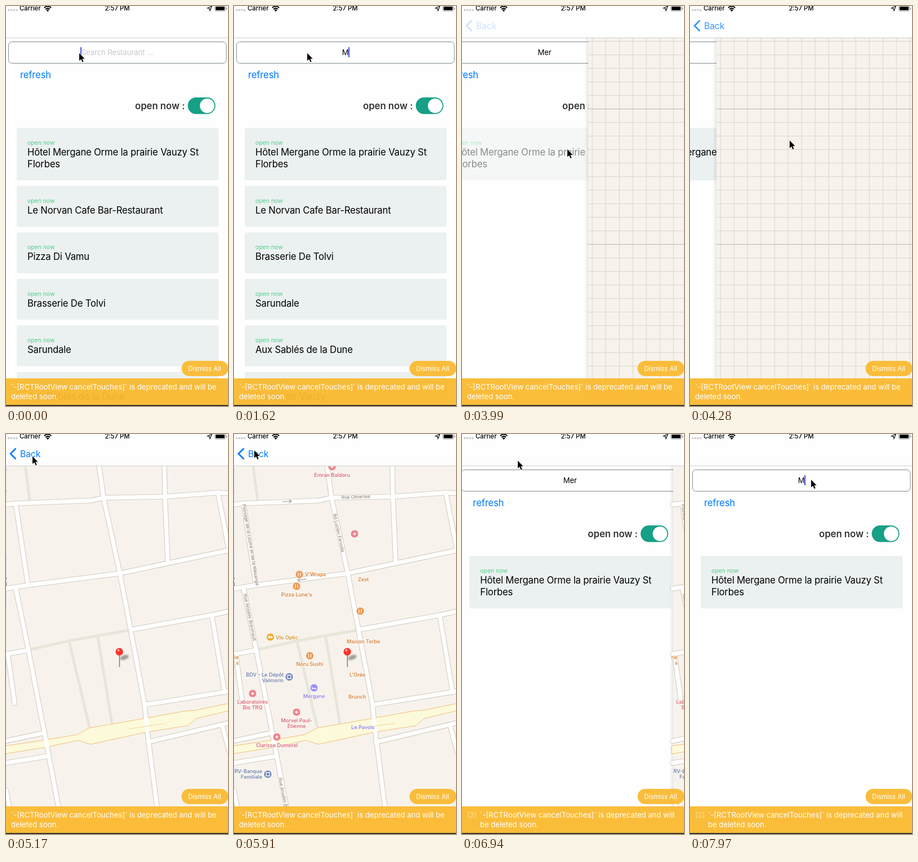
An HTML page that plays this animation: 394 px wide and 709 px high, repeating every 8 s.

```html
<!DOCTYPE html>
<html lang="fr">
<head>
<meta charset="utf-8">
<title>Restaurant search</title>
<style>
html, body { margin: 0; height: 100%; overflow: hidden; background: #fff; }
svg { display: block; width: 100vw; height: 100vh; font-family: Inter, Roboto, sans-serif; }
text { white-space: pre; }
.poi { font-size: 9.1px; font-weight: 500; }
.street { font-size: 8px; fill: #85807b; }
.poi, .street { paint-order: stroke; stroke: #faf7f1; stroke-width: 2px; stroke-linejoin: round; }
</style>
</head>
<body>
<svg id="stage" viewBox="0 0 394 709" preserveAspectRatio="none"></svg>
<script>
const STEP = 147.7, LOOP = 8000, BLUE = '#007aff';
const $ = id => document.getElementById(id);

const text = (x, y, size, str, fill, more = '') =>
  `<text x="${x}" y="${y}" font-size="${size}" fill="${fill}" ${more}>${str}</text>`;
const rect = (x, y, w, h, r, fill, more = '') =>
  `<rect x="${x}" y="${y}" width="${w}" height="${h}" rx="${r}" fill="${fill}" ${more}/>`;
const line = (d, color, width, more = '') =>
  `<path d="${d}" fill="none" stroke="${color}" stroke-width="${width}" ${more}/>`;
const MID = 'text-anchor="middle"';

// ---- restaurant list ----
const HOTEL = ['Hôtel Mergane Orme la prairie Vauzy St', 'Florbes'];
const OTHERS = ['Le Norvan Cafe Bar-Restaurant', 'Pizza Di Vamu', 'Brasserie De Tolvi',
  'Sarundale', 'Aux Sablés de la Dune', 'Panier de Vauzy'];

function card(y, lines) {
  return rect(19, y, 358, lines.length > 1 ? 93 : 72.3, 3, '#ebf0f0') +
    text(38, y + 30, 10.4, 'open now', '#50d089') +
    lines.map((s, i) => text(38, y + 49 + 21 * i, 16.7, s, '#000', 'letter-spacing="-.2"')).join('');
}
const cards = names => card(216, HOTEL) + names.map((s, i) => card(319 + 82.4 * i, [s])).join('');
const LISTS = [OTHERS.slice(0, 5), OTHERS.filter(s => !s.startsWith('Pizza')), []].map(cards);

const list = `
  ${rect(0, 0, 394, 709, 0, '#fefefe')}
  ${rect(4.5, 63.5, 386.5, 38, 6, '#fff', 'stroke="#7f8c8d"')}
  <rect id="selection" x="183" y="73" width="29" height="18" fill="#c8daee"/>
  ${text(197.5, 87, 13, '', '#000', 'id="input" ' + MID)}
  <rect id="caret" y="73" width="2" height="18" fill="#4a55dc"/>
  ${text(25, 128, 16.7, 'refresh', BLUE, 'letter-spacing="-.2"')}
  ${text(229, 183, 16.7, 'open now :', '#333', 'font-weight="600"')}
  ${rect(322.6, 162, 49, 29.6, 14.8, '#16a085')}
  <circle cx="357" cy="176.8" r="12.9" fill="#fff"/>
  <g id="cards"></g>
  <g id="bubble">
    <path d="M182.5 92.5H217a10 10 0 0 1 0 20.5H182.5Z" fill="#fff" stroke="#ccc"/>
    ${text(185, 108, 13, 'Met', BLUE)}
    ${line('M212 99.5l7 7m0-7l-7 7', '#aaa', 1)}
  </g>`;

// ---- map ----
let grid = '';
for (let i = 0; i < 17; i++) grid += `M${8 + 24 * i} 56V709`;
for (let i = 0; i < 27; i++) grid += `M0 ${62.5 + 24 * i}H396`;

const LANES = 'M34 56L42 118M43 382L110 367 160 358 218 348M112 368L148 520M163 360L188 514';
const ROADS = 'M0 125L18 123 150 118 173 113 282 111 375 104 396 105' +
  'M165 56L173 113 202 247 221 347 246 480 249 514 268 662M281 56L282 111 287 228' +
  'M376 104L396 208M0 274L39 268 202 247 287 229 396 206M17 124L39 268' +
  'M17 273L40 385 72 550 93 662M221 347L365 321 396 314M365 321L388 458' +
  'M246 480L396 456M0 390L40 383M3 390L15 477M0 544L66 530M0 583L74 571' +
  'M252 546L383 515 396 512M383 515L396 562M0 632L6 662';
const AVENUE = 'M-2 553L45 546 72 542 125 533 148 521 246 504 318 491 335 490 398 477V490' +
  'L338 504 322 517 246 529 150 550 128 543 72 555-2 567Z';
const ROUND = 'stroke-linecap="round" stroke-linejoin="round"';

const roads = line(LANES, '#e8e5d9', 5) + line(ROADS, '#d3ccc2', 9.6, ROUND) +
  `<path d="${AVENUE}" fill="#fcfadb" stroke="#f3bd77"/>` +
  line(ROADS, '#fff', 7.4, ROUND) +
  line('M217 523L250 518M247 518L285 513', '#f3c98d', .8);

const FOOD = ['#ee9650', '#d8762f', 'M-2-3.5V3.5M2-3.5V3.5'];
const CARE = ['#f0818e', '#d95a70', 'M-3 0H3M0-3V3'];
const BANK = ['#6f83b3', '#6478a8', 'M-3-3H3V3H-3Z'];
const STAY = ['#9d8ef2', '#8b79ea', 'M-3.5-2V2.5M-3.5 1H3.5V2.5'];
const SHOP = ['#f1ad2f', '#d08c20', 'M-3.5 0a1.5 1.5 0 1 0 3 0a1.5 1.5 0 1 0-3 0M.5 0a1.5 1.5 0 1 0 3 0a1.5 1.5 0 1 0-3 0'];

const icon = ([color, , mark], x, y) =>
  `<g transform="translate(${x} ${y})"><circle r="7" fill="${color}" stroke="#fff" stroke-width=".8"/>${line(mark, '#fff', 1.3)}</g>`;
const label = (kind, x, y, lines, anchor = 'middle') => lines.split('|').map((s, i) =>
  `<text class="poi" x="${x}" y="${y + 10 * i}" fill="${kind[1]}" text-anchor="${anchor}">${s}</text>`).join('');
const below = (kind, x, y, lines) => icon(kind, x, y) + label(kind, x, y + 17.5, lines);
const street = (x, y, angle, s) =>
  `<text class="street" transform="translate(${x} ${y}) rotate(${angle})">${s}</text>`;

const places =
  line('M86 120L102 119M98 116.5L102 119 98 122M129 257L113 259M117 256L113 259 117 261.5', '#b5b1ac', 1.6) +
  street(191, 115, -2, 'Rue Olmeraie') + street(176, 142, 78, 'Bd Lucien Farvolle') +
  street(15, 125, 80.5, 'Passage de la Loutre et de la Mésange') +
  street(17, 284, 78.5, 'Rue Anselm Brevinault') + street(79, 610, 78.5, 'Rue Anselm Brevinault') +
  below(CARE, 174, 58, 'Emran Baldoru') + icon(CARE, 214, 177) + icon(FOOD, 224, 314) +
  icon(FOOD, 116, 249) + label(FOOD, 126, 252, "V'Wraps", 'start') +
  below(FOOD, 111, 270, "Pizza Lune's") + label(FOOD, 220, 261, 'Zest', 'start') +
  icon(SHOP, 64.5, 360) + label(SHOP, 74, 364, 'Vlo Optic', 'start') +
  below(FOOD, 134.5, 393, 'Noru Sushi') +
  icon(BANK, 98, 430.5) + label(BANK, 88, 430, 'BDV - Le Dépôt|Valmorin', 'end') +
  below(CARE, 33, 460, 'Laboratoires|Bio TRQ') + below(STAY, 142, 450, 'Mergane') +
  below(CARE, 111, 493, 'Morvel Paul-|Étienne') + below(CARE, 76, 537, 'Clarisse Dumorel') +
  icon(BANK, 60, 603) + label(BANK, 50, 601, 'RV-Banque|Familiale', 'end') +
  label(FOOD, 8.5, 399, 'rie|s', 'end') + label(FOOD, 200, 371, 'Maison Torbe', 'start') +
  label(FOOD, 205, 430, "L'Orée", 'start') + label(FOOD, 203, 469, 'Brunch', 'start') +
  label(STAY, 208, 523, 'Le Pavois', 'start');

const pin = `
  <ellipse cx="210" cy="396" rx="8" ry="4" transform="rotate(-20 210 396)" fill="#000" opacity=".35" filter="url(#soft)"/>
  ${line('M201.3 391V413', '#85817e', 1.6)}
  <circle cx="201" cy="386" r="6.7" fill="#fb352b"/>
  <circle cx="199.3" cy="383.5" r="1.9" fill="#ffb1a8"/>`;

const map = `
  ${rect(-7, 56, 7, 653, 0, 'url(#edge)')}
  ${rect(0, 56, 396, 653, 0, '#f7f3ec')}
  <g transform="translate(-1)">
    <g id="grid">${line(grid, '#dad5cb', 1)}${line('M0 182.5H396M0 422.5H396', '#b9b4ab', 1)}</g>
    <g id="roads">${roads}<g id="places">${places}</g>${pin}</g>
  </g>`;

// ---- fixed chrome ----
const bars = `
  ${rect(0, 0, 394, 56, 0, '#fefefe')}${rect(0, 56, 394, 1, 0, '#d0d0d0')}
  ${[5, 9.7, 14.3, 19].map(x => `<circle cx="${x}" cy="7.3" r="1.7" fill="#c6c6c6"/>`).join('')}
  ${text(24, 8, 11.3, 'Carrier', '#000', 'font-weight="500"')}
  ${line('M67.8 3.2Q74 -2.2 80.2 3.2M70.2 5.8Q74 2.4 77.8 5.8', '#000', 2)}
  <path d="M71.5 7.4Q74 5.3 76.5 7.4L74 10Z"/>
  ${text(197.5, 8, 11.3, '2:57 PM', '#000', 'font-weight="500" ' + MID)}
  ${line('M357.5 3.8L365.5 0 362 8.3 361.3 4.5Z', '#000', 1.1)}
  ${rect(370.5, -.5, 19, 9.5, 2.5, '#fff', 'stroke="#999"')}${rect(372, 1, 16, 6.5, 1.3, '#000')}
  ${rect(390.7, 2.5, 1.5, 4, .7, '#999')}
  <g id="back">
    ${line('M17.5 25.5L8 35 17.5 44.5', BLUE, 2.8)}
    ${text(25, 41, 15.8, 'Back', BLUE, 'letter-spacing="-.2"')}
  </g>`;

const warning = `
  ${rect(311.5, 629, 83, 27, 13.5, '#fabb35', 'fill-opacity=".97"')}
  ${text(352.5, 647, 11.4, 'Dismiss All', '#fff', MID)}
  ${rect(0, 660, 394, 47.5, 0, '#faba30', 'fill-opacity=".95"')}
  ${rect(0, 707.3, 394, 2, 0, '#1c1a16')}
  <g id="once">
    ${text(9, 679.6, 13.1, '`-[RCTRootView cancelTouches]` is deprecated and will be', '#fff')}
    ${text(9, 696.6, 13.1, 'deleted soon.', '#fff')}
  </g>
  <g id="twice">
    ${text(9, 679.6, 13.1, '(2)', '#fff', 'opacity=".5"')}
    ${text(32, 679.6, 13.1, '`-[RCTRootView cancelTouches]` is deprecated and will', '#fff')}
    ${text(32, 696.6, 13.1, 'be deleted soon.', '#fff')}
  </g>`;

$('stage').innerHTML = `
  <defs>
    <linearGradient id="edge"><stop stop-opacity="0"/><stop offset="1" stop-opacity=".09"/></linearGradient>
    <filter id="soft" x="-50%" y="-50%" width="200%" height="200%"><feGaussianBlur stdDeviation="1.7"/></filter>
  </defs>
  <g id="list">${list}</g><g id="map">${map}</g>${bars}${warning}
  <path id="cursor" d="M0 0V13.6L3.2 10.7 5.5 16 7.6 15 5.4 10H9.6Z" stroke="#fff" stroke-width="1.2" paint-order="stroke"/>`;

// ---- timeline, counted in steps ----
const PUSH = 27, POP = 44, DONE = 50;
const CURSOR = [[0, 130, 83.5], [14, 130, 83.5], [18, 158, 221], [20, 158, 221], [25, 187, 254], [28, 187, 254],
  [34, 50, 42], [35, 47, 39.5], [36, 47, 39.5], [40, 36, 29], [45, 36, 29], [DONE, 215, 81], [55, 215, 81]];
const TYPED = [[0, ''], [3, 'e'], [8, ''], [11, 'M'], [12, 'Me'], [13, 'Mer'], [53, 'Me'], [54, 'M']];
const PRESS = { 24: .7, 25: .3, 26: .3, 27: .45, 28: .8 };

function cursorAt(k) {
  const i = CURSOR.findIndex(p => p[0] > k), [k0, x0, y0] = CURSOR[i - 1], [k1, x1, y1] = CURSOR[i];
  const u = (k - k0) / (k1 - k0), e = u * u * (3 - 2 * u);
  return [x0 + (x1 - x0) * e, y0 + (y1 - y0) * e];
}

// Critically damped spring, already under way at its first step.
function spring(steps) {
  const a = 7.5 * (steps * STEP / 1000 + .196);
  return 1 - (1 + a) * Math.exp(-a);
}

const show = (id, on) => $(id).style.display = on ? '' : 'none';
const move = (id, x, y = 0) => $(id).setAttribute('transform', `translate(${x} ${y})`);
let shownList = -1;

function draw(k) {
  const pushed = k < PUSH || k >= DONE ? 0 : k < POP ? spring(k - PUSH) : 1 - spring(k - POP);
  move('map', 394 - 393 * pushed);
  move('list', -.3 * 393 * pushed);
  show('map', pushed > 0);
  show('grid', k < 30);
  show('roads', k >= 30);
  show('places', k >= 39);
  $('back').style.opacity = pushed ** (k < POP ? 2 : 3);

  const value = TYPED.findLast(p => p[0] <= k)[1], input = $('input');
  input.textContent = value || 'Search Restaurant ...';
  input.setAttribute('fill', value ? '#000' : '#c7c7cd');
  const half = input.getComputedTextLength() / 2;
  $('caret').setAttribute('x', Math.round(197.5 + (value ? half : -half - 1.8)));
  const fixing = k >= 15 && k < 22;
  show('caret', k < 15 || k >= DONE - 1);
  show('selection', fixing);
  show('bubble', fixing);

  const which = k < 4 ? 0 : k < 13 ? 1 : 2;
  if (which !== shownList) $('cards').innerHTML = LISTS[shownList = which];
  $('cards').style.opacity = PRESS[k] ?? 1;

  show('once', k < 46);
  show('twice', k >= 46);
  move('cursor', ...cursorAt(k));
}

function tick() {
  draw(Math.floor((performance.now() % LOOP + 8) / STEP));
  requestAnimationFrame(tick);
}
tick();
</script>
</body>
</html>
```
